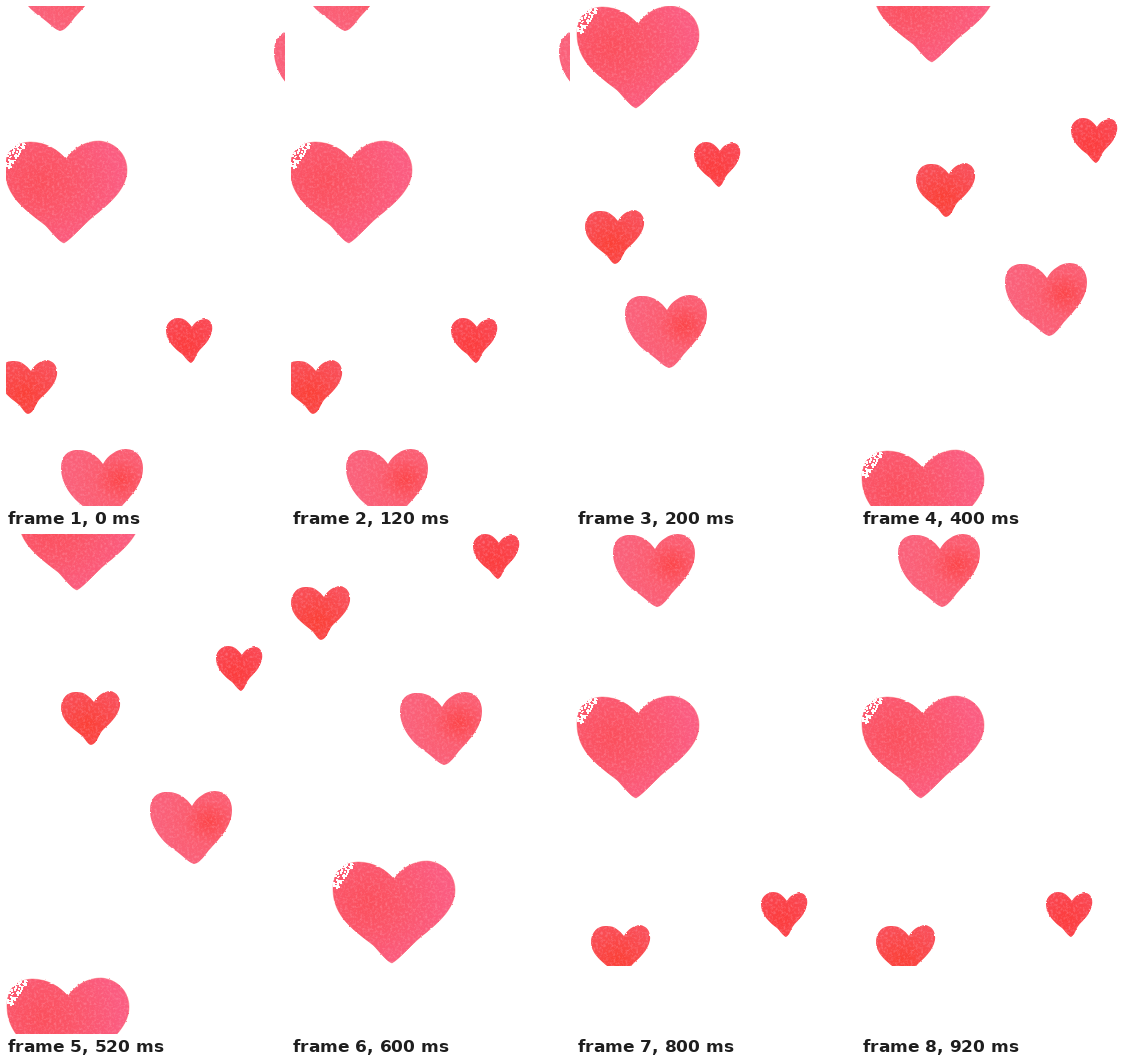
Animation of 279 by 500 pixels, one loop 1 s. Source, as an HTML page:

```html
<!DOCTYPE html>
<html lang="en">
<head>
<meta charset="utf-8">
<title>Watercolour hearts</title>
<style>
html, body { margin: 0; width: 100%; height: 100%; overflow: hidden; background: #fff; }
body > svg { display: block; width: 100%; height: 100%; }
</style>
</head>
<body>
<svg viewBox="0 0 279 500">
  <defs>
    <filter id="paint" x="-5%" y="-5%" width="110%" height="110%" color-interpolation-filters="sRGB">
      <feTurbulence type="fractalNoise" baseFrequency=".4" numOctaves="3" seed="4" result="noise"/>
      <feDisplacementMap in="SourceGraphic" in2="noise" scale="2" xChannelSelector="R" yChannelSelector="G" result="shape"/>
      <feColorMatrix in="noise" values="0 0 0 0 1  0 0 0 0 .65  0 0 0 0 .72  .9 0 0 0 -.4"/>
      <feComposite in2="shape" operator="in" result="grain"/>
      <feMerge><feMergeNode in="shape"/><feMergeNode in="grain"/></feMerge>
    </filter>
    <radialGradient id="bigWash" cx=".28" cy=".4" r=".65">
      <stop offset="0" stop-color="#fb4f5c"/><stop offset=".45" stop-color="#fb566a"/><stop offset="1" stop-color="#fb5c80"/>
    </radialGradient>
    <radialGradient id="pinkWash" cx=".72" cy=".42" r=".6">
      <stop offset="0" stop-color="#fc4549"/><stop offset=".5" stop-color="#fb5d70"/><stop offset="1" stop-color="#fa617a"/>
    </radialGradient>
    <radialGradient id="coralWash" cx=".45" cy=".65" r=".65">
      <stop offset="0" stop-color="#fb4036"/><stop offset="1" stop-color="#f94f58"/>
    </radialGradient>
    <radialGradient id="redWash" cx=".45" cy=".6" r=".65">
      <stop offset="0" stop-color="#fc3c3c"/><stop offset="1" stop-color="#fa4853"/>
    </radialGradient>

    <g id="big">
      <path filter="url(#paint)" fill="url(#bigWash)" stroke="#f7424f" stroke-opacity=".5" stroke-width=".8" d="M59 102C53 100 48 92 40 84C22 70 0 56 0 28C0 10 10 2 25 1C42 1 54 10 61 18C69 6 82 0 94 0C110 1 122 13 122 29C122 47 106 61 94 71C80 81 68 97 59 102Z"/>
      <path id="flecks" fill="#fff"/>
    </g>
    <path id="pink" filter="url(#paint)" fill="url(#pinkWash)" d="M44 73C39 72 33 65 26 60C12 51 0 36 0 19C0 6 8 0 18 1C29 1 37 8 42 15C47 6 56 0 65 0C76 0 82 9 82 19C82 36 69 48 61 57C55 63 51 72 44 73Z"/>
    <path id="coral" filter="url(#paint)" fill="url(#coralWash)" d="M30 54C26 53 24 47 20 44C11 37 0 29 0 17C0 7 7 0 16 1C24 1 29 6 33 11C37 4 42 1 49 0C56 1 60 7 59 15C57 26 48 33 41 40C37 45 36 53 30 54Z"/>
    <path id="red" filter="url(#paint)" fill="url(#redWash)" d="M25 45C22 44 19 39 16 36C9 31 0 23 0 12C0 5 6 0 12 0C19 0 23 5 26 9C29 3 35 1 40 1C45 2 47 7 46 13C44 23 37 28 33 33C29 38 29 43 25 45Z"/>
  </defs>
  <g id="stage"></g>
</svg>
<script>
const STEP = 200;
const stage = document.getElementById('stage');

// Dry-paper flecks in the big heart's upper left corner
let seed = 7;
const random = () => (seed = seed * 16807 % 2147483647) / 2147483647;
let flecks = '';
for (let i = 0; i < 150; i++) {
  const x = random() * 20, y = 2 + random() * 25;
  if (x + y * .7 < 24 && x + y > 7) flecks += `M${x | 0} ${y | 0}h2v${1 + (random() * 2 | 0)}h-2z`;
}
document.getElementById('flecks').setAttribute('d', flecks);

// Each pose: lower edge of the picture, then hearts as name, left, top, scale
const poses = [
  [500, ['pink', 10, -48], ['pink', 268, 24, 1.15], ['big', -1, 135], ['red', 160, 312], ['coral', -8, 354], ['pink', 55, 443]],
  [500, ['big', 1, 0], ['red', 118, 136], ['coral', 9, 204], ['pink', 49, 289]],
  [500, ['big', 12, -46], ['red', 210, 112], ['coral', 55, 157], ['pink', 144, 257], ['big', 1, 444]],
  [500, ['red', 182, 0], ['coral', 0, 52], ['pink', 109, 158], ['big', 42, 327]],
  [432, ['pink', 37, 0], ['big', 1, 162], ['red', 185, 358], ['coral', 15, 391]]
];
const heart = ([id, x, y, scale = 1]) =>
  `<use href="#${id}" transform="translate(${x} ${y}) scale(${scale})"/>`;
const pictures = poses.map(([bottom, ...hearts]) =>
  `<svg width="279" height="${bottom}">${hearts.map(heart).join('')}</svg>`);

const start = performance.now();
let shown = -1;
function draw(now) {
  const current = Math.floor(Math.max(0, now - start) / STEP) % poses.length;
  if (current !== shown) stage.innerHTML = pictures[shown = current];
  requestAnimationFrame(draw);
}
draw(start);
</script>
</body>
</html>
```
